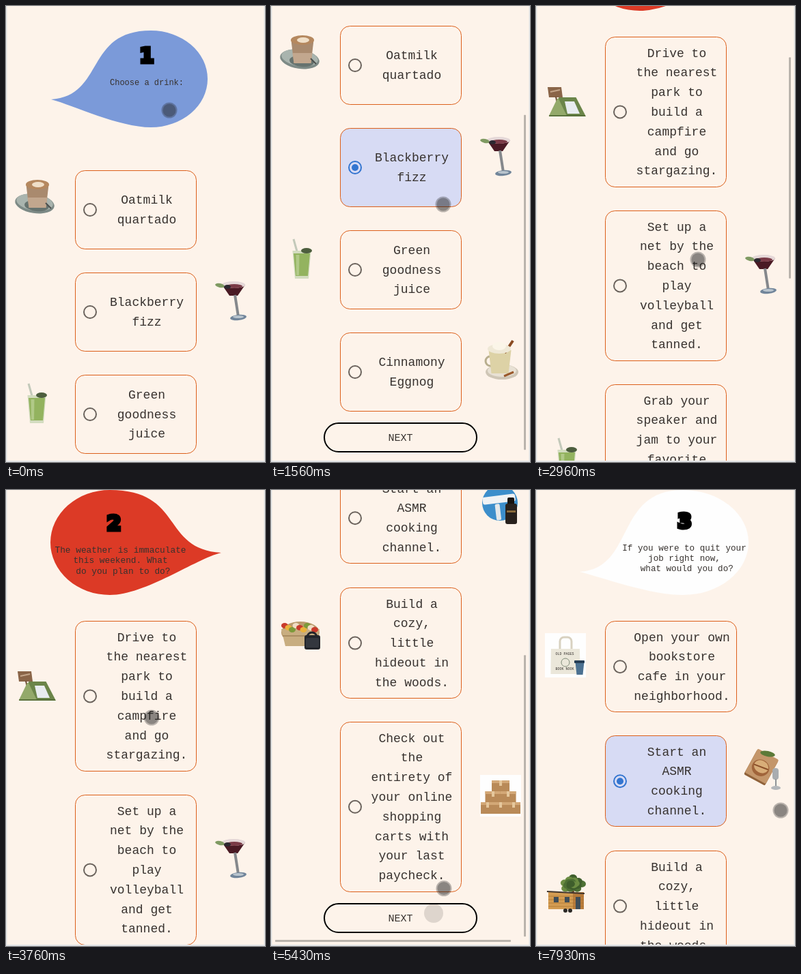
Write an HTML page with a canvas that moves like this. It is 379x669 px and loops after 8 s.

```html
<!DOCTYPE html>
<html lang="en">
<head>
<meta charset="utf-8">
<title>Quiz</title>
<style>
html, body { margin: 0; width: 100%; height: 100%; overflow: hidden; background: #fdf3ea; }
canvas { display: block; width: 379px; height: 669px; }
</style>
</head>
<body>
<canvas id="stage"></canvas>
<script>
const W = 379, H = 669, LOOP = 8000;
const LINE = 28.8, GAP = 34, MIN_CARD = 116;
const INK = '#37322f', BLUE = '#3375d0', EDGE = '#e2e4e6', BAR = '#b9b3ac';
const MONO = '"Liberation Mono", "Noto Sans Mono", monospace';
const canvas = document.getElementById('stage');
const dpr = window.devicePixelRatio || 1;
canvas.width = W * dpr;
canvas.height = H * dpr;
const c = canvas.getContext('2d');

// timing
const part = (t, a, b) => Math.max(0, Math.min(1, (t - a) / (b - a)));
const ease = (t, a, b) => { const u = part(t, a, b); return u * u * (3 - 2 * u); };
const fling = (t, a, b) => 1 - (1 - part(t, a, b)) ** 2.5;

// shapes
function fill(color) {
  c.fillStyle = color;
  c.fill();
}
function stroke(color, width) {
  c.strokeStyle = color;
  c.lineWidth = width;
  c.stroke();
}
function oval(color, x, y, rx, ry = rx, tilt = 0) {
  c.beginPath();
  c.ellipse(x, y, rx, ry, tilt, 0, 2 * Math.PI);
  fill(color);
}
function box(color, x, y, w, h, r = 0) {
  c.beginPath();
  c.roundRect(x, y, w, h, r);
  fill(color);
}
function line(color, width, x1, y1, x2, y2) {
  c.beginPath();
  c.moveTo(x1, y1);
  c.lineTo(x2, y2);
  stroke(color, width);
}
function ring(color, width, x, y, r) {
  c.beginPath();
  c.arc(x, y, r, 0, 2 * Math.PI);
  stroke(color, width);
}
// trapezoid centred on x, from its top edge down; lean shifts the bottom
function cup(color, x, y, top, bottom, h, lean = 0) {
  c.beginPath();
  c.moveTo(x - top / 2, y);
  c.lineTo(x + top / 2, y);
  c.lineTo(x + lean + bottom / 2, y + h);
  c.lineTo(x + lean - bottom / 2, y + h);
  fill(color);
}
function text(str, x, y, size, color = INK) {
  c.font = size + 'px ' + MONO;
  c.textAlign = 'center';
  c.fillStyle = color;
  c.fillText(str, x, y);
}
// round body with a tail drawn out to (tipX, tipY)
function drop(color, tipX, tipY, x, y, rx, ry) {
  const len = x - tipX, left = len > 0;
  c.beginPath();
  c.moveTo(tipX, tipY);
  c.bezierCurveTo(tipX + .54 * len, tipY - 5, tipX + .335 * len, y - ry, x, y - ry);
  c.ellipse(x, y, rx, ry, 0, -Math.PI / 2, Math.PI / 2, !left);
  c.bezierCurveTo(x - .32 * len, y + ry, tipX + .23 * len, tipY + 9, tipX, tipY);
  fill(color);
}
function digit(n, x, y) {
  c.font = '900 30px "DejaVu Sans", sans-serif';
  c.textAlign = 'center';
  c.fillStyle = '#000';
  c.fillText(n, x, y);
  c.strokeStyle = '#000';
  c.lineWidth = 5;
  c.lineJoin = 'miter';
  c.strokeText(n, x, y);
}

// little pictures, relative to the middle of a card's edge
const art = {
  latte() {
    oval('#7d8a86', 0, -9, 29, 14, .15);
    oval('#a9b4ae', 0, -11, 27, 12, .15);
    oval('#66736f', 3, -6, 18, 8, .1);
    cup('#a98a6e', 4, -37, 33, 25, 34);
    cup('#c2a78e', 4, -18, 29, 25, 15);
    oval('#b5885f', 4, -37, 17, 7);
    oval('#f0dfc8', 5, -37, 9, 4);
    line('#4c504e', 2, 16, -10, 24, -2);
  },
  cocktail() {
    cup('#4a1a24', -3, -40, 34, 12, 16);
    oval('#e5d8d8', -3, -40, 17, 5);
    oval('#7a3a46', -2, -38, 12, 3);
    line('#85888c', 4, -1, -25, 4, 7);
    oval('#71859a', 4, 8, 12, 4, -.1);
    oval('#b9c4cd', 4, 7, 8, 2);
    oval('#7f9a62', -23, -39, 7, 3, .2);
    oval('#2c2830', -12, -37, 5, 3);
  },
  juice() {
    line('#c3c9ba', 3, -9, -45, -2, -20);
    cup('#d3dcc0', 3, -28, 27, 20, 41);
    cup('#93b35f', 3, -24, 24, 18, 33);
    cup('#b1c988', -3, -22, 5, 4, 30);
    oval('#4d5e3e', 10, -28, 8, 4);
  },
  eggnog() {
    oval('#cfc6b6', 2, 0, 24, 11);
    oval('#e8e1d4', 2, -2, 21, 9);
    ring('#b8ae8e', 3, -15, -16, 7);
    cup('#ddd2a6', -1, -32, 33, 25, 34);
    line('#8a4a22', 4, 6, -28, 18, -46);
    oval('#efe8d6', -2, -34, 17, 7);
    oval('#fbf5e8', -2, -38, 10, 6);
    line('#9a5a2c', 3, 5, 6, 19, 0);
  },
  tent() {
    cup('#8a6548', -15, -36, 20, 20, 15, 2);
    line('#c4a68a', 2, -21, -29, -7, -32);
    line('#6b4a32', 2, -13, -22, -10, -8);
    cup('#6b8549', 4, -21, 25, 54, 28);
    cup('#93a96a', -10, -19, 2, 26, 25);
    cup('#e8ecef', 7, -15, 14, 18, 18, 6);
    line('#4d6632', 1.5, -23, 6, 30, 6);
  },
  ball() {
    oval('#3c8ecb', -1, -23, 26);
    c.save();
    c.rotate(-.12);
    box('#f0f2f4', -23, -34, 48, 11, 3);
    box('#e4e8ea', -6, -22, 7, 24, 2);
    c.restore();
    box('#17130f', 10, -31, 10, 12, 2);
    box('#28211d', 7, -22, 17, 30, 3);
    box('#8a6b3c', 9, -12, 13, 3);
  },
  picnic() {
    oval('#b99a6c', 1, -15, 28, 16);
    cup('#c8ad80', 1, -20, 56, 44, 25);
    const fruit = ['#c93a2b', '#e9b23c', '#7c9a3a', '#f0dcc4'];
    for (let i = 0; i < 9; i++) oval(fruit[i % 4], -22 + i * 5.5, -25 + i % 3 * 3, 5, 4);
    line('#8d6c42', 1, -25, -10, 26, -10);
    ring('#23252a', 3, 18, -8, 7);
    box('#23252a', 7, -11, 23, 21, 3);
    box('#34373e', 9, -7, 19, 14, 2);
  },
  parcels() {
    box('#fefefe', -30, -47, 60, 61);
    for (let row = 0; row < 3; row++)
      for (let i = 0; i <= row; i++) {
        const w = 26 - row * 3, x = (i - row / 2) * (w - 1) - w / 2, y = -39 + row * 16;
        box('#b98a58', x, y, w, 17);
        box('#d3a877', x, y, w, 4);
        box('#e5c79c', x + w / 2 - 2, y, 4, 8);
      }
  },
  tote() {
    box('#fefefe', -29, -49, 60, 65);
    c.beginPath();
    c.roundRect(-7, -43, 17, 26, 6);
    stroke('#d8d1c0', 3);
    cup('#ebe7da', 1, -26, 42, 43, 37);
    text('OLD PAGES', 0, -17, 5);
    ring('#7f8a78', 1, 1, -6, 6);
    text('BOOK NOOK', 0, 5, 5);
    cup('#4c7191', 22, -7, 13, 9, 19);
    box('#263e55', 14, -9, 15, 4, 1);
  },
  board() {
    c.save();
    c.translate(-6, -23);
    c.rotate(.5);
    box('#8f6139', -17, -18, 35, 41, 2);
    box('#c4966a', -17, -20, 35, 40, 2);
    oval('#a0643a', 0, 3, 13, 12);
    oval('#d8ad78', 0, 1, 11, 9);
    line('#8a4e28', 2, -11, 3, 11, 0);
    c.restore();
    oval('#5c7a38', 3, -41, 11, 4, .2);
    box('#a9adb0', 10, -20, 9, 17, 4);
    line('#8e9396', 2, 15, -4, 15, 8);
    oval('#b3b7ba', 15, 9, 7, 3);
  },
  house() {
    line('#6a4a30', 4, 12, -22, 12, 2);
    const leaf = ['#4d7034', '#6b8c42', '#3f5e2c'];
    for (let i = 0; i < 18; i++) {
      const r = 1 - i / 20;
      oval(leaf[i % 3], 11 + 14 * r * Math.cos(i * 2.4), -32 + 10 * r * Math.sin(i * 2.4), 6, 5);
    }
    box('#b97c3c', -24, -20, 52, 25);
    box('#d49c52', -24, -20, 36, 25);
    line('#40352c', 2, -26, -21, 29, -18);
    for (let y = -14; y < 4; y += 5) line('#a8702f', .7, -24, y, 28, y);
    for (const x of [-16, 0, 16]) box('#3f4d58', x, -13, 7, x > 9 ? 18 : 8);
    for (const x of [1, 8]) oval('#2b2825', x, 7, 3);
  }
};

const pages = [
  {
    start: 0, top: 241, pick: 1, pickAt: 1440,
    drop: ['#7b9ad9', 66, 137, 212, 107, 83, 71],
    digitX: 206, x: 206, y: 115.5, size: 12,
    title: ['Choose a drink:'],
    art: ['latte', 'cocktail', 'juice', 'eggnog'],
    cards: ['Oatmilk|quartado', 'Blackberry|fizz', 'Green|goodness|juice', 'Cinnamony|Eggnog'],
    scroll: t => 205 * fling(t, 420, 1270) + 12 * ease(t, 1440, 1660)
  },
  {
    start: 2250, loaded: 4100, top: 192, pick: 0, pickAt: 4130,
    drop: ['#dc3a26', 315, 92, 152, 77, 87, 77],
    digitX: 158, x: 167.5, y: 92, size: 12.8,
    title: ['The weather is immaculate', 'this weekend. What', ' do you plan to do?'],
    art: ['tent', 'ball', 'picnic', 'parcels'],
    cards: ['Drive to|the nearest|park to|build a|campfire|and go|stargazing.',
      'Set up a|net by the|beach to|play|volleyball|and get|tanned.',
      'Grab your|speaker and|jam to your|favorite|tunes at a|picnic with|your best|friends.',
      'Stay in and|order all|the things|you need|online to|refresh|your home|for the|summer.'],
    scroll: t => 216 * (1 - ease(t, 2810, 3210)) + 675 * fling(t, 4230, 4890)
  },
  {
    start: 5370, loaded: 5600, top: 192, pick: 1, pickAt: 7130,
    drop: ['#fefefe', 64, 120, 215, 77, 96, 77],
    digitX: 217.5, x: 217, y: 88.5, size: 12.6,
    title: ['If you were to quit your', 'job right now,', ' what would you do?'],
    art: ['tote', 'board', 'house', 'parcels'],
    cards: ['Open your own|bookstore|cafe in your|neighborhood.', 'Start an|ASMR|cooking|channel.',
      'Build a|cozy,|little|hideout in|the woods.',
      'Check out|the|entirety of|your online|shopping|carts with|your last|paycheck.'],
    scroll: t => 386 * (1 - fling(t, 5650, 6110))
  }
];
for (const p of pages) {
  let y = p.top;
  p.cards = p.cards.map(s => {
    const lines = s.split('|');
    const longest = Math.max(...lines.map(l => l.length));
    const card = { lines, y, h: Math.max(MIN_CARD, lines.length * LINE + 19.2), w: longest > 12 ? 193 : 178 };
    y += card.h + GAP;
    return card;
  });
  p.next = y - 17.6;
  p.height = p.next + 62.6;
}

// pointer moves: start, end, target
const moves = [
  [30, 200, 259, 265], [380, 1180, 252, 291], [1660, 2200, 238, 621], [2250, 2960, 237, 372],
  [3490, 3760, 213, 334], [4100, 4890, 239, 344], [4920, 5190, 238, 621], [5340, 5630, 302, 465],
  [6430, 7220, 216, 435], [7250, 7410, 271, 497], [7730, 7930, 358, 470]
];
const barShown = [[380, 1850], [2250, 3490], [4100, 4920], [5340, 6440]];
const taps = [2230, 5350];

function pointer(t) {
  let x = 239, y = 153;
  for (const [a, b, toX, toY] of moves) {
    const u = ease(t, a, b);
    x += (toX - x) * u;
    y += (toY - y) * u;
  }
  return [x, y];
}

function drawCard(card, on, scroll) {
  const y = Math.round(card.y - scroll), mid = y + card.h / 2, x = 117 + card.w / 2;
  c.beginPath();
  c.roundRect(101.5, y + .5, card.w - 1, Math.round(card.h) - 1, 14);
  if (on) fill('#d7dbf4');
  stroke('#dc5f1a', 1);
  ring(on ? BLUE : '#6b635d', 2, 123, mid, 9);
  if (on) oval(BLUE, 123, mid, 5);
  card.lines.forEach((s, i) => text(s, x, mid + (i - (card.lines.length - 1) / 2) * LINE + 5.5, 18));
}

function drawPage(n, t, scroll) {
  const page = pages[n];
  c.save();
  c.translate(0, -scroll);
  drop(...page.drop);
  digit(n + 1, page.digitX, page.y - 33);
  page.title.forEach((s, i) => text(s, page.x, page.y + i * 15.3, page.size));
  c.restore();

  page.cards.forEach((card, i) => {
    drawCard(card, i === page.pick && t >= page.pickAt, scroll);
    // pictures of the previous page stay until the new ones load
    const stale = t < page.loaded && (n === 2 || i > 0);
    c.save();
    c.translate(i % 2 ? 336 : 42, Math.round(card.y + card.h / 2 - scroll));
    art[pages[stale ? n - 1 : n].art[i]]();
    c.restore();
  });

  const y = Math.round(page.next - scroll);
  c.beginPath();
  c.roundRect(78, y + 1, 223, 42, 21);
  stroke('#000', 2);
  text('NEXT', 189.5, y + 27, 15);
}

function draw(t) {
  const n = pages.findLastIndex(p => t >= p.start);
  const page = pages[n];
  const scroll = Math.round(Math.min(page.scroll(t), page.height - H));
  c.setTransform(dpr, 0, 0, dpr, 0, 0);
  box('#fdf3ea', 0, 0, W, H);
  drawPage(n, t, scroll);

  c.globalAlpha = Math.max(...barShown.map(([a, b]) => t < a ? 0 : 1 - ease(t, b, b + 270)));
  box(BAR, 370, 4 + scroll / page.height * 651, 3, H / page.height * 651, 1);
  if (n === 2) box(BAR, 6, 660, 345, 3, 1);
  c.globalAlpha = 1;

  for (const tap of taps)
    if (t > tap) oval(`rgba(0,0,0,${.12 * (1 - part(t, tap + 100, tap + 200))})`, 238, 621, 14);
  const [x, y] = pointer(t);
  for (const r of [11.5, 9.5]) oval('rgba(30,30,30,.3)', x, y, r);

  box(EDGE, 0, 0, 1.5, H);
  box(EDGE, W - 1.5, 0, 1.5, H);
  box(EDGE, 0, H - 2, W, 2);
}

function frame(now) {
  draw(now % LOOP);
  requestAnimationFrame(frame);
}
requestAnimationFrame(frame);
</script>
</body>
</html>
```
